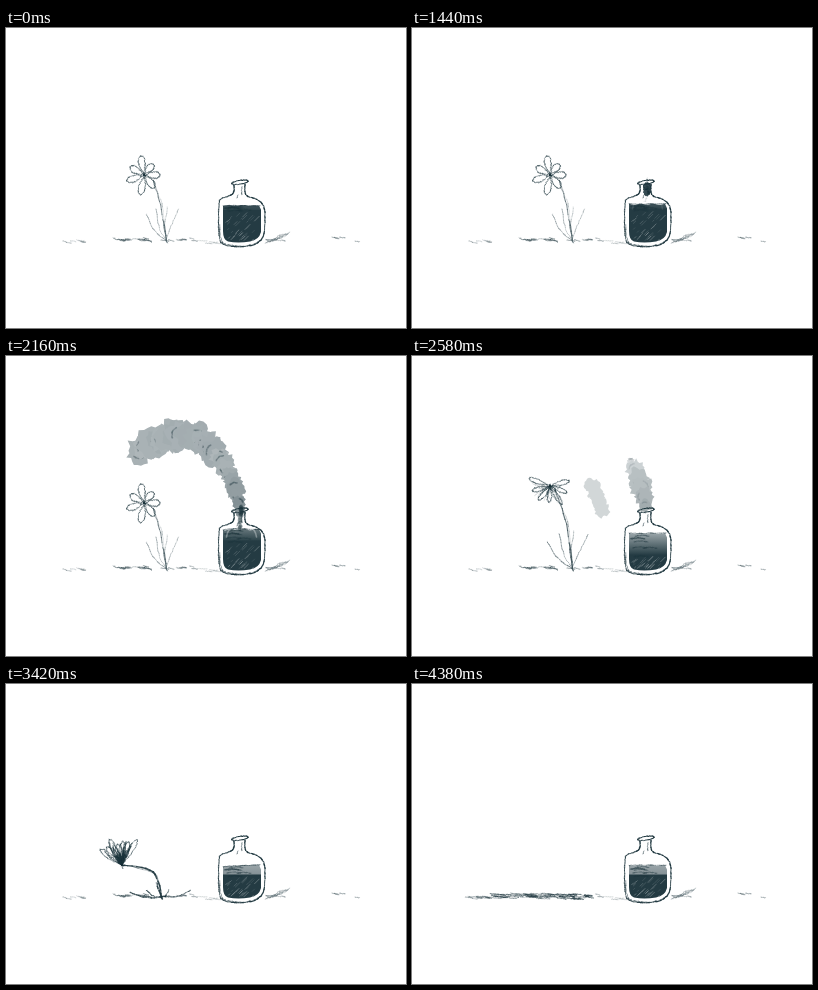
Write an HTML page with a canvas that moves like this. It is 400x300 px and loops after 4660 ms.

```html
<!DOCTYPE html>
<html lang="en">
<head>
<meta charset="utf-8">
<title>Ink bottle and flower</title>
<style>
html, body { margin: 0; width: 100%; height: 100%; overflow: hidden; background: #fff; }
canvas { display: block; width: 400px; height: 300px; }
</style>
</head>
<body>
<canvas id="stage" width="400" height="300"></canvas>
<script>
const ctx = document.getElementById('stage').getContext('2d');
const LOOP = 4660, INK = [29, 53, 61], RAD = Math.PI / 180;

const clamp = v => Math.max(0, Math.min(1, v));
const mix = (a, b, k) => a + (b - a) * k;
const span = (t, a, b) => clamp((t - a) / (b - a));
const ease = (t, a, b) => { const k = span(t, a, b); return k * k * (3 - 2 * k); };
const ink = a => `rgba(${INK},${a})`;
// opaque tint between white and ink
const tint = k => `rgb(${INK.map(c => Math.round(mix(255, c, k)))})`;

function random(seed) {
  let s = seed * 7919 + 17;
  return () => {
    s = (s + 0x6D2B79F5) | 0;
    let r = Math.imul(s ^ (s >>> 15), s | 1);
    r ^= r + Math.imul(r ^ (r >>> 7), r | 61);
    return ((r ^ (r >>> 14)) >>> 0) / 4294967296;
  };
}

function spline(p, steps = 8) {
  const out = [];
  for (let i = 0; i < p.length - 1; i++) {
    const a = p[i - 1] || p[i], b = p[i], c = p[i + 1], d = p[i + 2] || c;
    for (let j = 0; j < steps; j++) {
      const u = j / steps;
      out.push([0, 1].map(n => 0.5 * (2 * b[n] + (c[n] - a[n]) * u
        + (2 * a[n] - 5 * b[n] + 4 * c[n] - d[n]) * u * u
        + (3 * b[n] - a[n] - 3 * c[n] + d[n]) * u * u * u)));
    }
  }
  out.push(p[p.length - 1]);
  return out;
}

// Grainy stroke: width and tone vary along the line
function pencil(points, seed, width = 1, alpha = 1, wobble = 0.25) {
  const rnd = random(seed);
  const pts = spline(points).map(([x, y]) =>
    [x + (rnd() - 0.5) * wobble * 2, y + (rnd() - 0.5) * wobble * 2]);
  for (let i = 1; i < pts.length; i++) {
    ctx.strokeStyle = ink(alpha * (0.4 + 0.6 * rnd()));
    ctx.lineWidth = width * (0.7 + 0.6 * rnd());
    ctx.beginPath();
    ctx.moveTo(...pts[i - 1]);
    ctx.lineTo(...pts[i]);
    ctx.stroke();
  }
}

function blob(x, y, r, seed, color) {
  const rnd = random(seed), n = 26;
  ctx.fillStyle = color;
  ctx.beginPath();
  for (let i = 0; i < n; i++) {
    const a = i / n * 2 * Math.PI, q = r * (0.75 + 0.45 * rnd());
    ctx.lineTo(x + Math.cos(a) * q, y + Math.sin(a) * q);
  }
  ctx.fill();
}

// Rough, nearly level dashes scattered over a strip
function dashes(x0, x1, y, height, count, seed, alpha, len = 8) {
  const rnd = random(seed);
  for (let i = 0; i < count; i++) {
    const x = mix(x0, x1, rnd()), h = y + (rnd() - 0.5) * height, d = len * (0.25 + rnd() * 0.3);
    pencil([[x - d, h - rnd()], [x, h], [x + d, h + rnd()]], seed + i, 0.75, alpha * (0.4 + rnd() * 0.6));
  }
}

function ground() {
  dashes(58, 80, 213.5, 3, 6, 11, 0.3);
  pencil([[107, 210], [118, 212], [136, 211], [146, 214]], 12, 0.8, 0.75, 0.6);
  dashes(110, 143, 211.5, 3, 9, 13, 0.5);
  dashes(148, 190, 211.5, 3, 9, 14, 0.4);
  dashes(194, 212, 213, 5, 4, 15, 0.25);
  for (let i = 0; i < 6; i++)
    pencil([[259 + i * 2, 215 - i / 2], [268 + i * 2, 211 - i / 2], [274 + i * 2, 207 - i / 2]], 20 + i, 0.8, 0.3, 0.5);
  dashes(262, 280, 212, 1, 4, 27, 0.4);
  dashes(329, 340, 210, 1, 3, 31, 0.45);
  dashes(350, 353, 213, 1, 1, 35, 0.3);
}

// Bottle -----------------------------------------------------------------

const GLASS = [[228, 157], [228, 163], [225, 167], [215, 171], [213, 177], [212.5, 197],
  [214, 212], [218, 216.5], [229, 218.5], [245, 217.5], [254, 213], [258, 205],
  [259, 188], [257, 177], [250, 171], [241, 168], [239, 163], [239, 156]];

function liquid(t) {
  const surge = ease(t, 1320, 1800) * (1 - ease(t, 1920, 2400));
  const haze = ease(t, 1900, 2500), calm = ease(t, 2600, 3040);
  const level = 177.5 - 8 * surge + 4 * ease(t, 3000, 3450);
  const band = 4 + 17 * haze - 12 * calm;
  const tone = mix(0.85, 0.45, haze);
  const swing = Math.sin(t / 600 * 2 * Math.PI) * (t < 1320 ? 2 : t > 3000 && t < 3600 ? 1 : 0);
  const top = x => level + swing * (x - 235) / 18 + Math.sin(x / 2 + t / 90) * (0.4 + surge);

  const fill = ctx.createLinearGradient(0, level, 0, level + band + 0.5);
  fill.addColorStop(0, tint(tone));
  fill.addColorStop(0.9, tint(mix(mix(0.95, tone, calm), 0.8, 0.25)));
  fill.addColorStop(1, tint(0.97));
  ctx.fillStyle = fill;
  ctx.beginPath();
  for (let x = 217; x <= 254; x += 2) ctx.lineTo(x, top(x));
  ctx.lineTo(255, level + 4);
  ctx.lineTo(255, 204);
  ctx.quadraticCurveTo(253, 212, 244, 213.5);
  ctx.quadraticCurveTo(232, 215.5, 222, 213.5);
  ctx.quadraticCurveTo(217, 212, 217, 203);
  ctx.fill();

  const rnd = random(60);
  for (let i = 0; i < 7; i++) {
    const x = 218 + rnd() * 20, y = top(x) + 1 + rnd() * band;
    pencil([[x, y + 1], [x + 7, y], [x + 14, y + 1]], 61 + i, 1.2, 0.35);
  }
  pencil([217, 226, 240, 254].map(x => [x, top(x)]), 72, 0.8, 0.8);
  ctx.lineWidth = 0.8;
  // paper showing through the ink
  for (let i = 0; i < 34; i++) {
    const x = 219 + rnd() * 30, y = mix(level + band + 5, 213, rnd()), d = 1 + rnd() * 4;
    ctx.strokeStyle = `rgba(255,255,255,${0.08 + rnd() * 0.32})`;
    ctx.beginPath();
    ctx.moveTo(x, y);
    ctx.lineTo(x + d, y - d);
    ctx.stroke();
  }
  if (surge > 0) {
    pencil([[235, 150], [235, 160], [233, 174]], 86, 8 * surge, surge, 1);
    ctx.strokeStyle = `rgba(255,255,255,${0.65 * surge})`;
    ctx.lineWidth = 1.6;
    ctx.beginPath();
    for (const side of [-1, 1]) {
      ctx.moveTo(235.5 + side * 7, 170);
      ctx.quadraticCurveTo(235.5 + side * 14, 173, 235.5 + side * 15, 181);
    }
    ctx.stroke();
  }
}

function bottle(t) {
  liquid(t);
  pencil(GLASS, 40, 1.1, 1.1);
  pencil(GLASS.slice(5, 11).map(([x, y]) => [x + 1, y - 0.7]), 41, 0.8, 0.7, 0.5);
  const lip = [];
  for (let a = 0; a <= 360; a += 45)
    lip.push([234 + 8.2 * Math.cos(a * RAD), 154.3 - 1.2 * Math.cos(a * RAD) + 1.9 * Math.sin(a * RAD)]);
  pencil(lip, 42, 0.9, 1);
  pencil([[236, 158], [235.5, 163], [236, 167]], 44, 0.7, 0.6);
  pencil([[232, 167], [231, 170]], 45, 0.7, 0.5);
}

// Smoke ------------------------------------------------------------------

// A column above the neck that leans left, spreads and thins out from its far end
function smoke(t) {
  if (t < 1380 || t >= 2940) return;
  const count = 24, step = Math.floor(t / 120);
  const rise = ease(t, 1340, 1800), drift = ease(t, 1830, 2340), gone = span(t, 2600, 2940);
  const reach = mix(1.1, 0.24, ease(t, 2400, 2570));
  const halo = rise * (1 - drift);
  if (halo > 0.5)
    for (const side of [-1, 1]) blob(240 + side * 13, 126 - side * 2, 10 * halo, 90 + side, tint(0.25));

  for (let i = count - 1; i >= 0; i--) {
    const k = i / (count - 1), rnd = random(100 + i + step * 40);
    const size = clamp((reach - k) * 12) * (0.8 + 0.4 * rnd());
    const x = mix(235 + 5 * Math.sin(i * 1.9) * k * rise, 233 - 140 * k ** 1.5, drift);
    const y = mix(165 - 56 * k * rise, 150 - 90 * Math.sin(2.4 * k), drift);
    const r = mix(3 + 5 * k * rise, 8 + 20 * k * (1 - k / 2), drift) * size;
    const tone = mix(0.9, mix(0.42, 0.18, clamp(k * 4)), drift) * (1 - gone);
    if (r < 0.5) continue;
    blob(x, y - gone * 12, r, 140 + i + step, tint(tone + (rnd() - 0.5) * 0.06));
    // curled brush marks
    const turn = rnd() * 6;
    const curl = [0, 0.7, 1.4].map(a => [x + Math.cos(turn + a) * r * 0.6, y - gone * 12 + Math.sin(turn + a) * r * 0.6]);
    pencil(curl, 180 + i, 1.5, mix(0.6, 0.05, drift) * (1 - gone));
  }
  if (t >= 2400)
    for (let i = 0; i < 5; i++)
      blob(180 + i * 2.6, 130 + i * 6, 7.5, 230 + i, tint(0.2 * (1 - gone)));
}

// Flower -----------------------------------------------------------------

// fresh, drooping, dry, bent, flat
const STAGES = [
  { x: 138, y: 147, turn: -200, fan: 300, len: 17, width: 3.6, dry: 0 },
  { x: 138, y: 130, turn: -15, fan: 215, len: 19, width: 2.4, dry: 0.3 },
  { x: 141, y: 120, turn: 60, fan: 240, len: 17, width: 1.5, dry: 0.8 },
  { x: 116, y: 181, turn: -145, fan: 85, len: 25, width: 3, dry: 1 },
  { x: 94, y: 211, turn: -185, fan: 25, len: 17, width: 1.5, dry: 0.8 }
];

function headAt(stage) {
  const i = Math.min(3, Math.floor(stage)), head = {};
  for (const key in STAGES[i]) head[key] = mix(STAGES[i][key], STAGES[i + 1][key], stage - i);
  return head;
}

function petal(x, y, angle, len, w, seed, alpha) {
  const c = Math.cos(angle), s = Math.sin(angle);
  const at = (u, v) => [x + c * len * u - s * w * v, y + s * len * u + c * w * v];
  pencil([at(0.1, 0), at(0.5, 0.8), at(0.85, 0.8), at(1, 0), at(0.75, -0.9), at(0.4, -0.7), at(0.1, 0)],
    seed, 0.75, alpha, 0.5);
}

function flower(t) {
  const fade = 1 - span(t, 3900, 4380);
  if (!fade) return;
  const stage = ease(t, 2420, 2550) + ease(t, 2640, 3040) + ease(t, 3090, 3400) + ease(t, 3540, 4020);
  const { x, y, turn, fan, len, width, dry } = headAt(stage);
  const fall = clamp(stage - 2), weight = 0.8 + dry * 0.6, tone = 0.65 + dry * 0.3;
  ctx.globalAlpha = fade;

  const foot = [161 - 5 * fall, 215];
  const bend = (4 + 6 * fall) * clamp((214 - y) / 30);
  const knee = [(x + foot[0]) / 2 + bend + 1, (y + foot[1]) / 2 - bend];
  const neck = [x + 9 * (1 - clamp(stage / 2)), y + 5 * (1 - clamp(stage / 2))];
  pencil([neck, knee, foot], 201, weight, tone, 0.4);
  pencil([neck, [knee[0] + 2, knee[1] + 2], foot], 202, weight * 0.7, tone * 0.6, 0.6);
  pencil([[mix(knee[0], foot[0], 0.4), mix(knee[1], foot[1], 0.4)], foot], 203, weight * 1.2, tone, 0.6);

  for (let i = 0; i < 4; i++) {
    const lean = (38 + 6 * stage) * (1.6 * i / 3 - 1) * RAD, size = 32 + 4 * stage;
    const tip = [160 + Math.sin(lean) * size, 211 - Math.cos(lean) * size * (1 - 0.88 * fall)];
    const sag = [(tip[0] + 160) / 2 - 2, (tip[1] + 211) / 2 + 4];
    pencil([tip, sag, [160, 212]], 210 + i, i ? weight * 0.7 : weight, tone * 0.85, 0.4);
  }

  const rnd = random(240);
  for (let i = 0; i < 7; i++)
    petal(x, y, (turn + fan * i / 6) * RAD, len * (0.75 + 0.45 * rnd()), width, 220 + i, 0.75);
  // dried fibres
  for (let i = 0; i < 30; i++) {
    const a = (turn + fan * rnd()) * RAD, d = len * (0.35 + rnd() * 0.7), bow = (rnd() - 0.5) * 4;
    const tip = [x + Math.cos(a) * d, y + Math.sin(a) * d];
    pencil([[x, y], [(x + tip[0]) / 2 + bow, (y + tip[1]) / 2 - bow], tip], 250 + i, 0.7 + fall * 0.5, dry * 0.65);
  }
  for (let i = 0; i < 9; i++) {
    const a = rnd() * 7, d = rnd() * 4;
    pencil([[x, y], [x + Math.cos(a) * d, y + Math.sin(a) * d]], 290 + i, 1, 0.4);
  }
  ctx.globalAlpha = 1;
}

function remains(t) {
  const k = span(t, 3660, 4380);
  dashes(54, 78, 213.5, 2, 7 * k, 301, 0.4, 10);
  dashes(80, 136, 211.5, 5, 26 * k, 311, 0.55, 14);
  dashes(116, 168, 212.5, 5, 26 * k, 351, 0.75, 12);
  dashes(158, 178, 213, 4, 9 * k, 391, 0.8);
}

// The drawing advances in held steps of varying length
function stepped(t) {
  const [from, hold] = t < 2400 ? [0, 120] : t < 3540 ? [2400, 30] : t < 4020 ? [3540, 60] : [4020, 120];
  return Math.min(4380, from + Math.floor((t - from) / hold + 1e-6) * hold);
}

function draw(t) {
  ctx.fillStyle = '#fff';
  ctx.fillRect(0, 0, 400, 300);
  ctx.lineCap = ctx.lineJoin = 'round';
  ground();
  remains(t);
  flower(t);
  smoke(t);
  bottle(t);
}

let shown = -1;
const start = performance.now();
function tick(now) {
  const t = stepped(Math.max(0, now - start) % LOOP);
  if (t !== shown) draw(shown = t);
  requestAnimationFrame(tick);
}
tick(start);
</script>
</body>
</html>
```
